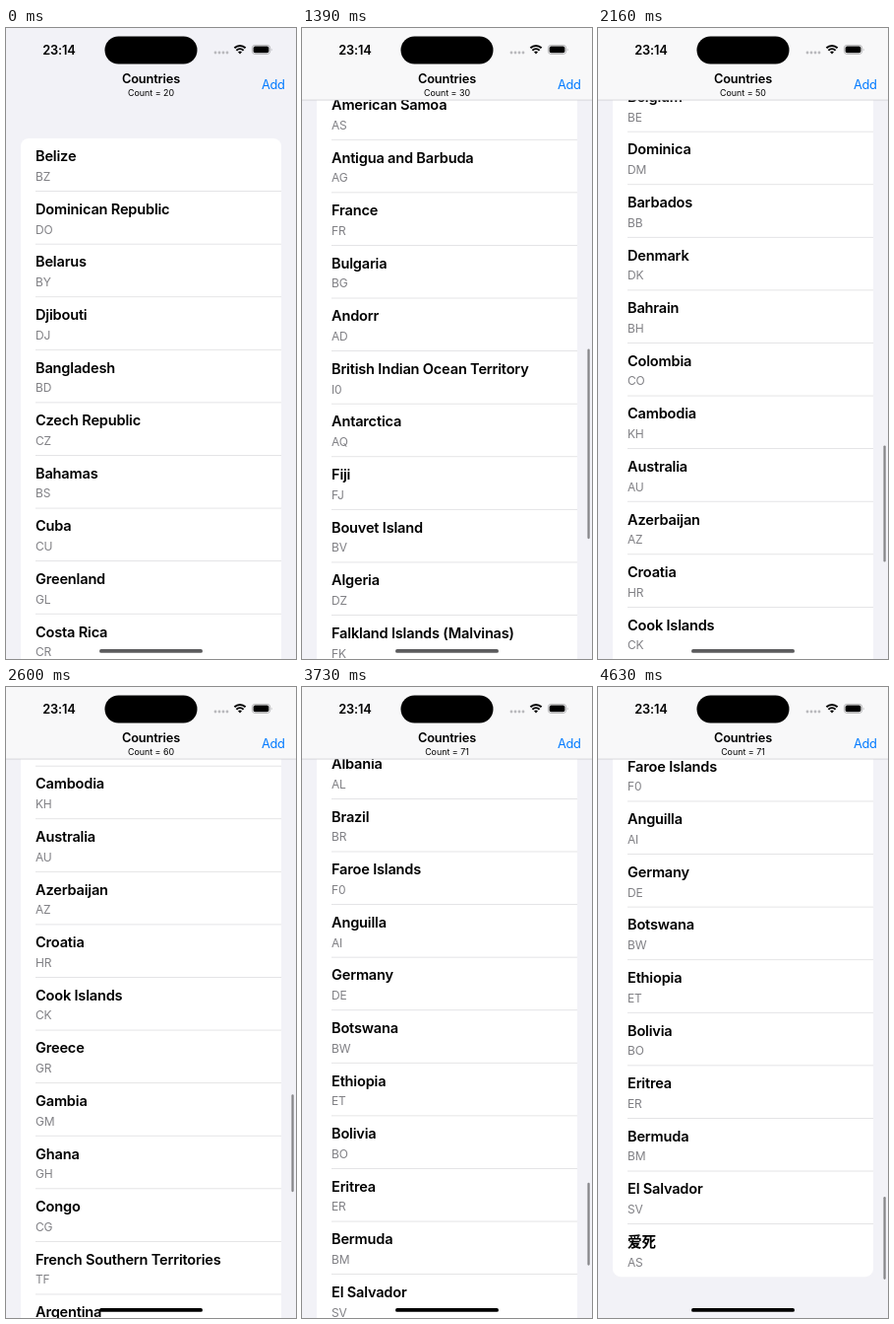
Write an HTML page that moves like this. It is 295 px wide and 640 px high and loops after 5.37 s.

```html
<!DOCTYPE html>
<html lang="en">
<head>
<meta charset="utf-8">
<title>Countries list</title>
<style>
  html, body { margin: 0; width: 100%; height: 100%; overflow: hidden; background: #f2f2f7; }
  svg { display: block; width: 295px; height: 640px; }
  text { font-family: Inter, "Noto Sans CJK SC", "Noto Sans CJK", sans-serif; fill: #000; }
  .title { font-size: 14.6px; font-weight: 600; letter-spacing: -.2px; }
  .code { font-size: 12px; letter-spacing: -.2px; fill: #808085; }
  .mid { text-anchor: middle; }
  .bar { font-size: 12.8px; font-weight: 600; letter-spacing: -.15px; }
  .count { font-size: 8.9px; }
  .add { font-size: 12.8px; letter-spacing: -.3px; fill: #007aff; }
</style>
</head>
<body>
<svg viewBox="0 0 295 640">
  <rect width="295" height="640" fill="#f2f2f7"/>
  <g id="list"><rect id="card" x="15" y="112" width="265" rx="8" fill="#fff"/></g>
  <g id="navBar">
    <rect width="295" height="73" fill="#f8f8f9"/>
    <rect y="72.7" width="295" height=".7" fill="#c9c9cd"/>
  </g>
  <text class="bar mid" x="54" y="26.6">23:14</text>
  <rect x="100.5" y="8.5" width="94" height="28" rx="14"/>
  <g fill="#b9b9bd">
    <circle cx="213" cy="25" r="1.4"/><circle cx="217" cy="25" r="1.4"/>
    <circle cx="221" cy="25" r="1.4"/><circle cx="225" cy="25" r="1.4"/>
  </g>
  <g fill="none" stroke="#000" stroke-width="1.9">
    <path d="M232.4 20.3a8 8 0 0 1 11.2 0M234.4 22.7a5.2 5.2 0 0 1 7.2 0"/>
    <path d="M236 24.3L238 26.5L240 24.3Q238 22.8 236 24.3Z" fill="#000" stroke="none"/>
  </g>
  <rect x="250.4" y="17.4" width="18.2" height="9" rx="2.8" fill="none" stroke="#a5a5a8" stroke-width=".8"/>
  <rect x="251.6" y="18.6" width="15.8" height="6.6" rx="1.8"/>
  <path d="M269.8 20.4q1.6 1.5 0 3z" fill="#a5a5a8"/>
  <text class="bar mid" x="147.5" y="55.6">Countries</text>
  <text class="count mid" id="count" x="147.5" y="68.5"></text>
  <text class="add" x="260" y="61.7">Add</text>
  <rect id="thumb" x="290.4" width="2.3" rx="1.15" fill="#87878a"/>
  <rect id="home" x="95" y="630" width="105" height="3.8" rx="1.9"/>
</svg>
<script>
const LOOP = 5370, ROW = 53.58, TOP = 112, REST = 3318;

const rows = `Belize BZ|Dominican Republic DO|Belarus BY|Djibouti DJ|Bangladesh BD|Czech Republic CZ|Bahamas BS|Cuba CU|Greenland GL|Costa Rica CR
Cameroon CM|Cyprus CY|Aruba AW|Canada CA|Chile CL|American Samoa AS|Antigua and Barbuda AG|France FR|Bulgaria BG|Andorr AD
British Indian Ocean Territory I0|Antarctica AQ|Fiji FJ|Bouvet Island BV|Algeria DZ|Falkland Islands (Malvinas) FK|Gabon GA|Georgia GE|Estonia EE|Åland Islands AX
Bhutan BT|Equatorial Guinea GQ|Benin BJ|Egypt EG|Belgium BE|Dominica DM|Barbados BB|Denmark DK|Bahrain BH|Colombia CO
Cambodia KH|Australia AU|Azerbaijan AZ|Croatia HR|Cook Islands CK|Greece GR|Gambia GM|Ghana GH|Congo CG|French Southern Territories TF
Argentina AR|Angola A0|Burkina Faso BF|Armenia AM|French Guiana GF|Afghanistan AF|Austria AT|Brunei Darussalam BN|Finland FI|Albania AL
Brazil BR|Faroe Islands F0|Anguilla AI|Germany DE|Botswana BW|Ethiopia ET|Bolivia BO|Eritrea ER|Bermuda BM|El Salvador SV|爱死 AS`
  .split(/[|\n]/).map(s => [s.slice(0, -3), s.slice(-2)]);

// Bursts of screen updates: first time, last time, number of updates.
const bursts = [[700, 1230, 6], [1390, 1820, 5], [1940, 2380, 5], [2490, 2950, 5],
  [3080, 3540, 5], [3730, 4160, 5], [4270, 4630, 4]];
const ticks = [0, ...bursts.flatMap(([a, b, n]) =>
  Array.from({ length: n }, (_, i) => a + (b - a) * i / (n - 1)))];

// Scroll path as [time, offset]; it overshoots the end and springs back.
const path = [[620, 0], [1390, 856], [1820, 1521.6], [2600, 2265.5], [3080, 2605.5],
  [3730, 3213.4], [3990, 3352], [4630, REST]];

const $ = id => document.getElementById(id);
const set = (el, attrs) => { for (const k in attrs) el.setAttribute(k, attrs[k]); return el; };
const add = (parent, tag, attrs, text = '') => {
  const el = set(document.createElementNS('http://www.w3.org/2000/svg', tag), attrs);
  el.textContent = text;
  return parent.appendChild(el);
};

const rowEls = rows.map(([title, code], i) => {
  const g = add($('list'), 'g', { transform: `translate(30 ${TOP + i * ROW})` });
  add(g, 'text', { class: 'title', y: 23.3 }, title);
  add(g, 'text', { class: 'code', y: 43 }, code);
  return { g, line: add(g, 'rect', { y: ROW - .4, width: 250, height: .8, fill: '#dedee0' }) };
});

// Monotone cubic slopes: harmonic mean of neighbouring speeds, zero at turning points.
const speeds = path.slice(1).map(([t, s], i) => (s - path[i][1]) / (t - path[i][0]));
const slopes = path.map((_, i) => {
  const a = speeds[i - 1] || 0, b = speeds[i] || 0;
  return a * b > 0 ? 2 * a * b / (a + b) : 0;
});

function offsetAt(t) {
  if (t <= path[0][0]) return 0;
  const i = path.findIndex(p => p[0] > t) - 1;
  if (i < 0) return REST;
  const [t0, s0] = path[i], [t1, s1] = path[i + 1];
  const d = t1 - t0, u = (t - t0) / d, v = 1 - u;
  return s0 * v * v * (1 + 2 * u) + s1 * u * u * (1 + 2 * v)
    + d * u * v * (slopes[i] * v - slopes[i + 1] * u);
}

// The next page loads as soon as the last loaded row comes into view.
function loadedAt(offset) {
  let n = 20;
  while (n < 70 && TOP + (n - 1) * ROW - offset < 640) n += 10;
  return n >= 70 ? rows.length : n;
}

function render(time) {
  const t = ticks.findLast(k => k <= time + .01);
  const offset = offsetAt(t), n = loadedAt(offset);
  set($('list'), { transform: `translate(0 ${-offset})` });
  set($('card'), { height: n * ROW });
  rowEls.forEach(({ g, line }, i) => {
    const y = TOP + i * ROW - offset;
    g.style.display = i < n && y > -ROW && y < 640 ? '' : 'none';
    line.style.display = i < n - 1 ? '' : 'none';
  });
  $('count').textContent = `Count = ${n}`;
  $('navBar').style.display = offset > 30 ? '' : 'none';

  const content = n * ROW + 90;
  const left = REST - (rows.length - n) * ROW - offset;
  const bottom = 601 - Math.max(left, 0) * 530 / content;
  const height = 327000 / content + Math.min(left, 0) * .6;
  set($('thumb'), { y: bottom - height, height });
  $('thumb').style.display = offset > 0 ? '' : 'none';
  set($('home'), { fill: t < 2490 ? '#5c5c5e' : '#000' });
}

const start = performance.now();
function loop() {
  render((performance.now() - start) % LOOP);
  requestAnimationFrame(loop);
}
loop();
</script>
</body>
</html>
```
